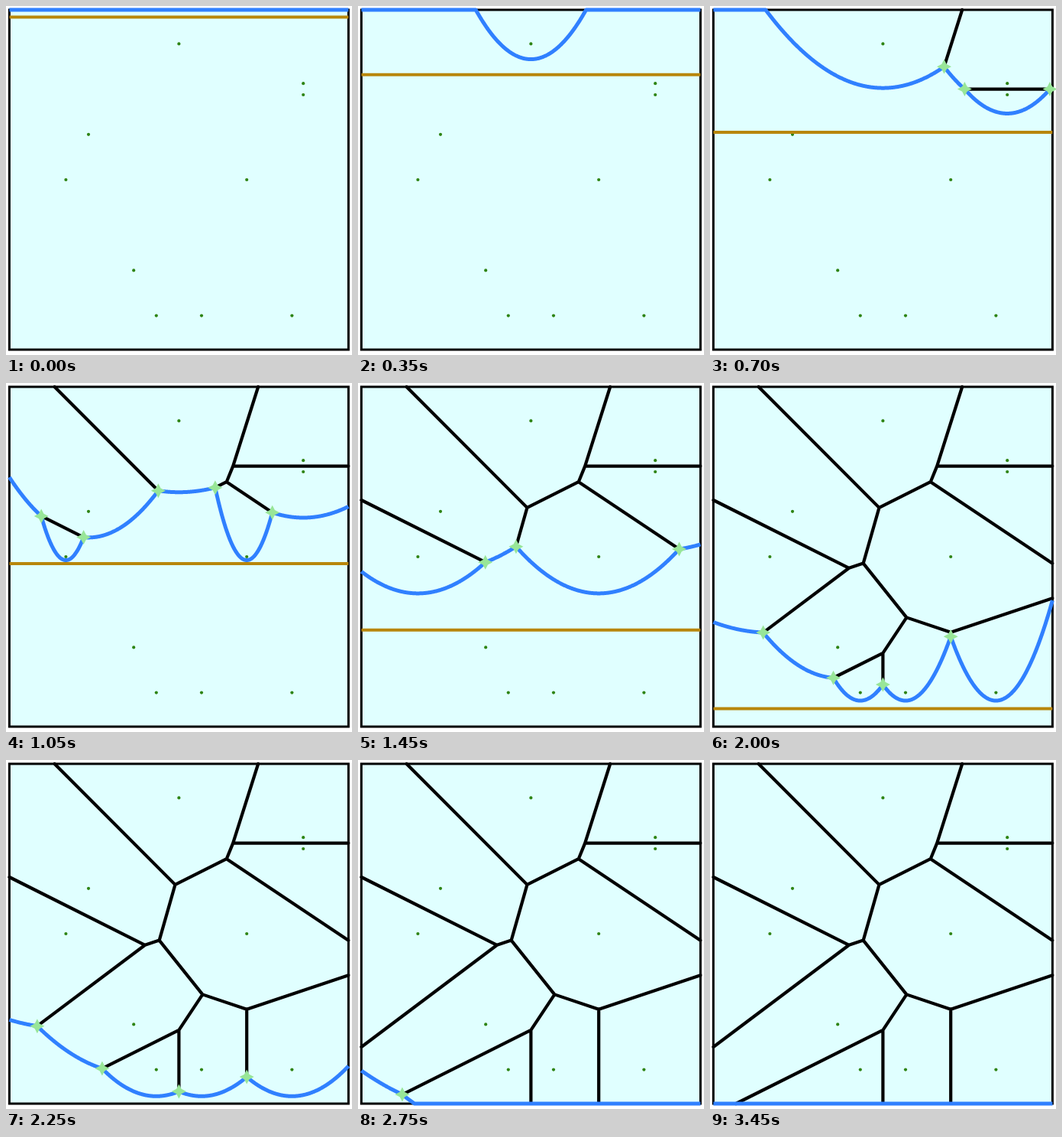
An HTML page for the animation above (3600 ms loop, 453 by 456 pixels).

```html
<!DOCTYPE html>
<html lang="en">
<head>
<meta charset="utf-8">
<title>Sweep line Voronoi diagram</title>
<style>
html, body { margin: 0; width: 100%; height: 100%; overflow: hidden; background: #fff; }
svg { display: block; width: 453px; height: 456px; }
path { fill: none; }
</style>
</head>
<body>
<svg viewBox="0 0 453 456">
  <rect id="box" fill="#e0ffff" stroke="#000" stroke-width="3"/>
  <g id="dots" fill="#2e8414"></g>
  <path id="edges" stroke="#000" stroke-width="4.2" stroke-linecap="round"/>
  <path id="sweep" stroke="#b8860b" stroke-width="4"/>
  <path id="beach" stroke="#3080ff" stroke-width="5" stroke-linejoin="round"/>
  <path id="stars" style="fill:#98e698"/>
</svg>
<script>
const LOOP = 3600, STEP = 50, SIZE = 15, UNIT = 29.6, LEFT = 4.4, TOP = 5;
const sites = [
  [7.5, 1.5], [13, 3.25], [13, 3.75], [3.5, 5.5], [2.5, 7.5],
  [10.5, 7.5], [5.5, 11.5], [6.5, 13.5], [8.5, 13.5], [12.5, 13.5]
];
// Sweep height in pixels over time
const keys = [[0, 14.6], [700, 164.9], [1050, 236], [1450, 322.8],
  [1750, 377], [2250, 474], [3050, 643]];

const el = id => document.getElementById(id);
const px = x => LEFT + x * UNIT;
const py = y => TOP + y * UNIT;
const at = (x, y) => px(x).toFixed(2) + ' ' + py(y).toFixed(2);
const mix = (a, b, t) => a + (b - a) * t;

// Part of segment ab that lies nearer to p than to q
function nearer(a, b, p, q) {
  const side = ([x, y]) =>
    (x - q[0]) ** 2 + (y - q[1]) ** 2 - (x - p[0]) ** 2 - (y - p[1]) ** 2;
  const u = side(a), v = side(b);
  if (u < 0 && v < 0) return null;
  if (u >= 0 && v >= 0) return [a, b];
  const t = u / (u - v), m = [mix(a[0], b[0], t), mix(a[1], b[1], t)];
  return u < 0 ? [m, b] : [a, m];
}

function clipToBox(a, b) {
  let lo = 0, hi = 1;
  for (const k of [0, 1]) {
    const d = b[k] - a[k];
    if (Math.abs(d) < 1e-9) {
      if (a[k] < 0 || a[k] > SIZE) return null;
      continue;
    }
    const s = -a[k] / d, e = (SIZE - a[k]) / d;
    lo = Math.max(lo, Math.min(s, e));
    hi = Math.min(hi, Math.max(s, e));
  }
  const point = t => [mix(a[0], b[0], t), mix(a[1], b[1], t)];
  return lo < hi ? [point(lo), point(hi)] : null;
}

function voronoi() {
  const out = [];
  sites.forEach((p, i) => sites.slice(i + 1).forEach(q => {
    const mx = (p[0] + q[0]) / 2, my = (p[1] + q[1]) / 2;
    const dx = (p[1] - q[1]) * 60, dy = (q[0] - p[0]) * 60;
    let seg = clipToBox([mx - dx, my - dy], [mx + dx, my + dy]);
    for (const r of sites) {
      if (seg && r !== p && r !== q) seg = nearer(...seg, p, r);
    }
    if (seg) out.push({ a: seg[0], b: seg[1], site: p });
  }));
  return out;
}
const edges = voronoi();

// Range of an edge already passed by the beach line
function traced({ a, b, site }, line) {
  if (site[1] > line) return null;
  const dx = b[0] - a[0], dy = b[1] - a[1];
  const wx = a[0] - site[0], wy = a[1] - site[1], h = line - a[1];
  const A = dx * dx, B = 2 * (wx * dx + wy * dy + h * dy);
  const C = wx * wx + wy * wy - h * h;
  let lo = 0, hi = 1;
  if (A < 1e-9) {
    if (B > 0) hi = Math.min(1, -C / B);
    else lo = Math.max(0, -C / B);
  } else {
    const D = B * B - 4 * A * C;
    if (D < 0) return null;
    lo = Math.max(0, (-B - Math.sqrt(D)) / (2 * A));
    hi = Math.min(1, (-B + Math.sqrt(D)) / (2 * A));
  }
  return lo < hi ? [lo, hi] : null;
}

function beachY(x, line) {
  let y = 0;
  for (const [sx, sy] of sites) {
    const d = line - sy;
    if (d > 1e-6) y = Math.max(y, (sy + line) / 2 - (x - sx) ** 2 / (2 * d));
  }
  return Math.min(y, SIZE);
}

function star(x, y) {
  let d = '';
  for (let i = 0; i < 8; i++) {
    const r = i % 2 ? 4.6 : 9.5, w = i * Math.PI / 4;
    d += (i ? 'L' : 'M') + (px(x) + r * Math.cos(w)).toFixed(2) + ' ' +
      (py(y) + r * Math.sin(w)).toFixed(2);
  }
  return d + 'Z';
}

function sweepAt(ms) {
  for (let i = 1; i < keys.length; i++) {
    const [t0, y0] = keys[i - 1], [t1, y1] = keys[i];
    if (ms <= t1) return (mix(y0, y1, (ms - t0) / (t1 - t0)) - TOP) / UNIT;
  }
  return (keys[keys.length - 1][1] - TOP) / UNIT;
}

function draw(ms) {
  const line = sweepAt(ms);
  let lines = '', marks = '', beach = '';
  for (const e of edges) {
    const range = traced(e, line);
    if (!range) continue;
    const [p, q] = range.map(t => [mix(e.a[0], e.b[0], t), mix(e.a[1], e.b[1], t)]);
    lines += 'M' + at(...p) + 'L' + at(...q);
    if (range[0] > 0) marks += star(...p);
    if (range[1] < 1) marks += star(...q);
  }
  const n = 890;
  for (let i = 0; i <= n; i++) {
    const x = SIZE * i / n;
    beach += (i ? 'L' : 'M') + at(x, beachY(x, line));
  }
  el('edges').setAttribute('d', lines);
  el('stars').setAttribute('d', marks);
  el('beach').setAttribute('d', beach);
  el('sweep').setAttribute('d',
    line <= SIZE ? 'M' + at(0, line) + 'L' + at(SIZE, line) : '');
}

const box = { x: LEFT, y: TOP, width: SIZE * UNIT, height: SIZE * UNIT };
for (const k in box) el('box').setAttribute(k, box[k]);
el('dots').innerHTML = sites.map(([x, y]) =>
  `<circle cx="${px(x)}" cy="${py(y)}" r="2.1"/>`).join('');

let start = null;
function tick(now) {
  if (start === null) start = now;
  draw(Math.floor(((now - start) % LOOP) / STEP) * STEP);
  requestAnimationFrame(tick);
}
draw(0);
requestAnimationFrame(tick);
</script>
</body>
</html>
```
